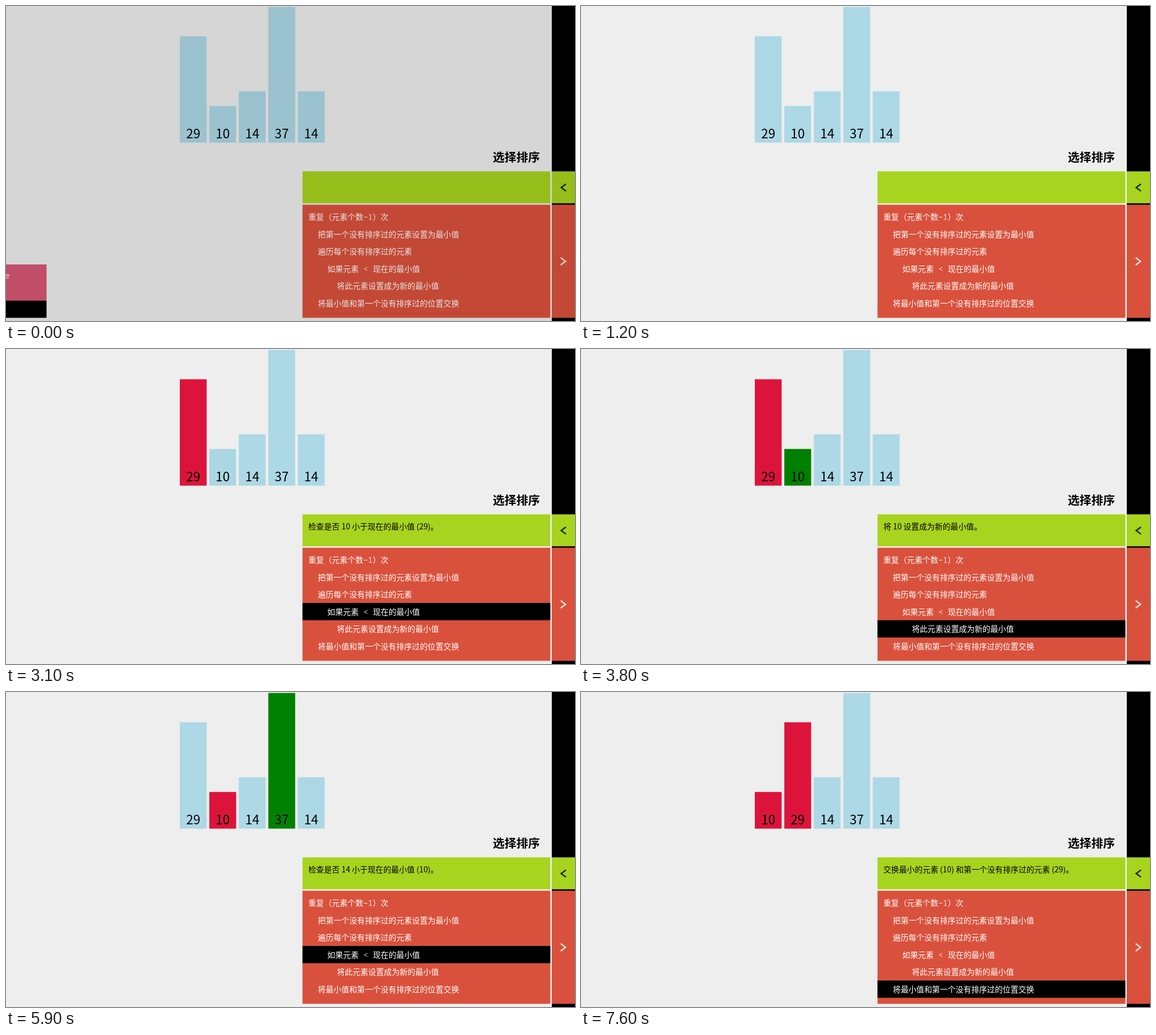
An HTML page for the animation above (8000 ms loop, 1005 by 557 pixels).

```html
<!DOCTYPE html>
<html lang="zh-CN">
<head>
<meta charset="utf-8">
<title>选择排序</title>
<style>
  html, body { margin: 0; width: 100%; height: 100%; overflow: hidden; background: #eee; }
  svg { display: block; width: 1005px; height: 557px; }
  text { font: 13.87px "Noto Sans CJK SC", "Noto Sans CJK", sans-serif; white-space: pre; }
  .mono { font-family: "Noto Sans Mono", monospace; font-weight: 200; fill-opacity: .8; }
  .num { font-size: 22.5px; text-anchor: middle; }
  .title { font-size: 20.83px; font-weight: 700; }
  .light { fill: #fff; }
  .green { fill: #a7d41e; }
  .red { fill: #d9513c; }
  .arrow { fill: none; stroke-width: 2.4; }
</style>
</head>
<body>
<svg viewBox="0 0 1005 557">
  <rect width="1005" height="557" fill="#eee"/>
  <g id="bars"></g>
  <text class="title" x="859.8" y="275">选择排序</text>

  <rect x="964" width="41" height="557"/>
  <rect class="green" x="964" y="292.4" width="41" height="56.4"/>
  <rect class="red" x="964" y="351.4" width="41" height="200"/>
  <path class="arrow" stroke="#1b2400" d="M989 314.8 980.6 321 989 327.4"/>
  <path class="arrow" stroke="#f8e4e0" d="M979.8 445 988.2 451.4 979.8 458"/>

  <rect class="green" x="523.7" y="292.4" width="437.7" height="56.4"/>
  <text class="info" x="534" y="319"></text>
  <text class="info" x="534" y="339.4"></text>

  <rect class="red" x="523.7" y="351.4" width="437.7" height="200"/>
  <rect id="mark" x="523.7" width="437.7"/>
  <g id="code"></g>

  <g id="menu">
    <rect x="-20" y="457" width="91.6" height="64" fill="#d65775"/>
    <rect x="-20" y="521" width="91.6" height="30.4"/>
    <text class="light" x="-1.8" y="481.5">e</text>
  </g>
  <rect id="shade" width="1005" height="557"/>
</svg>
<script>
const LOOP = 8000, TICK = 100, FADE = 250;
const PITCH = 52.1, ROW = 30.55, ROW_TOP = 357.4, PANEL_TOP = 351.4;
const COLORS = { b: [173, 216, 230], c: [220, 20, 60], g: [0, 128, 0] };
const VALUES = [29, 10, 14, 37, 14];

// Each code line: indent level, then its text; Latin parts are set in mono.
const CODE = [
  [0, '重复（元素个数−1）次'],
  [1, '把第一个没有排序过的元素设置为最小值'],
  [1, '遍历每个没有排序过的元素'],
  [2, '如果元素 < 现在的最小值'],
  [3, '将此元素设置成为新的最小值'],
  [1, '将最小值和第一个没有排序过的位置交换']
];

const check = (a, min) => [`检查是否 ${a} 小于现在的最小值 (${min})。`];

// at: text and line change; fade: bar colours start to blend; rows: first and last marked line
const STEPS = [
  { at: 0, fade: -FADE, bars: 'bbbbb', text: [] },
  { at: 2400, fade: 2350, bars: 'cbbbb', rows: [0, 2],
    text: ['循环 1: 把现在的最小值设置成为 29 , 然后通过遍历剩下的没有排序', '过的元素来找到真正的最小值。'] },
  { at: 3100, fade: 3065, bars: 'cgbbb', rows: [3, 3], text: check(10, 29) },
  { at: 3800, fade: 3785, bars: 'bcbbb', rows: [4, 4], text: ['将 10 设置成为新的最小值。'] },
  { at: 4500, fade: 4465, bars: 'bcgbb', rows: [3, 3], text: check(14, 10) },
  { at: 5200, fade: 5165, bars: 'bcbgb', rows: [3, 3], text: check(37, 10) },
  { at: 5900, fade: 5870, bars: 'bcbbg', rows: [3, 3], text: check(14, 10) },
  { at: 6600, fade: 6585, bars: 'ccbbb', rows: [5, 5],
    text: ['交换最小的元素 (10) 和第一个没有排序过的元素 (29)。'] }
];
const SWAP = 7280;

const $ = id => document.getElementById(id);
const clamp = x => Math.min(1, Math.max(0, x));
const cubic = x => x < .5 ? 4 * x ** 3 : 1 - 4 * (1 - x) ** 3;
const swing = x => (1 - Math.cos(Math.PI * x)) / 2;

function add(parent, tag, attrs, text) {
  const el = document.createElementNS('http://www.w3.org/2000/svg', tag);
  for (const key in attrs) el.setAttribute(key, attrs[key]);
  if (text) el.textContent = text;
  return parent.appendChild(el);
}

const bars = VALUES.map(value => {
  const g = add($('bars'), 'g', {});
  const height = value * 6.485;
  const rect = add(g, 'rect', { y: 241.6 - height, width: 47.4, height });
  add(g, 'text', { class: 'num', x: 23.7, y: 233.8 }, value);
  return { g, rect };
});

CODE.forEach(([level, line], i) => {
  const text = add($('code'), 'text', { class: 'light', x: 534 + level * 16.8, y: 378 + i * ROW });
  for (const part of line.split(/(−1| < )/))
    if (part) add(text, 'tspan', /[1<]/.test(part) ? { class: 'mono' } : {}, part);
});

const info = document.querySelectorAll('.info');
let shown = -1;

function showStep(index) {
  if (index === shown) return;
  shown = index;
  const { text, rows } = STEPS[index];
  info.forEach((el, i) => el.textContent = text[i] || '');
  const top = rows && rows[0] ? ROW_TOP + rows[0] * ROW : PANEL_TOP;
  const bottom = rows ? ROW_TOP + (rows[1] + 1) * ROW : top;
  $('mark').setAttribute('y', top);
  $('mark').setAttribute('height', bottom - top);
}

function draw(t) {
  const index = STEPS.findLastIndex(s => t >= s.at);
  const step = STEPS[index], prev = STEPS[Math.max(0, index - 1)];
  showStep(index);

  const mix = cubic(clamp((t - step.fade) / FADE));
  const shift = PITCH * cubic(clamp((t - SWAP) / FADE));
  bars.forEach(({ g, rect }, i) => {
    const from = COLORS[prev.bars[i]], to = COLORS[step.bars[i]];
    rect.setAttribute('fill', `rgb(${from.map((c, k) => Math.round(c + (to[k] - c) * mix))})`);
    const x = 307 + i * PITCH + (i === 0 ? shift : i === 1 ? -shift : 0);
    g.setAttribute('transform', `translate(${x} 0)`);
  });

  $('menu').setAttribute('transform', `translate(${-72 * swing(clamp((t - 950) / 250))} 0)`);
  $('shade').setAttribute('opacity', t < 400 ? .1 : t < 500 ? .05 : 0);
}

const start = performance.now();
function loop() {
  const t = (performance.now() - start) % LOOP;
  draw(Math.floor(t / TICK) * TICK);
  requestAnimationFrame(loop);
}
loop();
</script>
</body>
</html>
```
